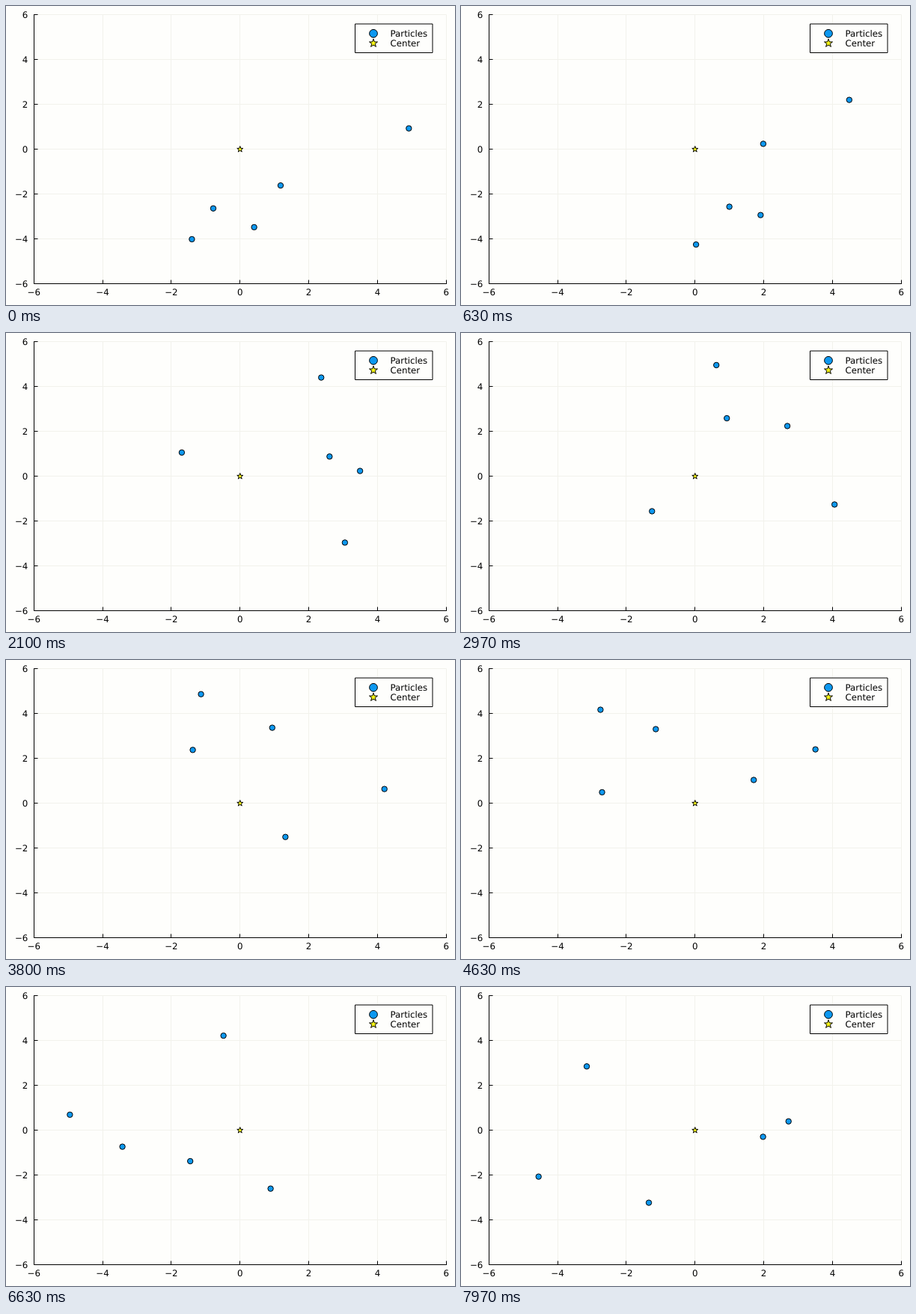
Write an HTML page with a canvas that moves like this. It is 600 px wide and 400 px high and loops after 8 s.

```html
<!DOCTYPE html>
<html lang="en">
<head>
<meta charset="utf-8">
<title>Orbiting particles</title>
<style>
  html, body { margin: 0; width: 100%; height: 100%; overflow: hidden; background: #fefefc; }
  canvas { display: block; width: 600px; height: 400px; }
</style>
</head>
<body>
<canvas id="stage"></canvas>
<script>
const W = 600, H = 400, LOOP = 8000;
const BG = '#fefefc', INK = '#000', GRID = '#f2f2ec', BLUE = '#0d98f0', YELLOW = '#fafa14';
const TICKS = [-6, -4, -2, 0, 2, 4, 6];

// Circular orbits: angular speed = sqrt(GM / r^3)
const GM = 10, STEP = 0.05;
const particles = [
  { r: 2, start: -53.83 },
  { r: 2.75, start: -106.45 },
  { r: 3.5, start: -83.26 },
  { r: 4.25, start: -109.25 },
  { r: 5, start: 10.76 }
];

const canvas = document.getElementById('stage');
const scale = window.devicePixelRatio || 1;
canvas.width = W * scale;
canvas.height = H * scale;
const ctx = canvas.getContext('2d');
ctx.scale(scale, scale);
ctx.font = '11.8px "DejaVu Sans", sans-serif';
ctx.textRendering = 'geometricPrecision';

const px = x => 312.75 + x * 45.92;
const py = y => 191.7 - y * 29.98;
const snap = v => Math.floor(v) + 0.5;

function line(x1, y1, x2, y2, color) {
  ctx.strokeStyle = color;
  ctx.beginPath();
  ctx.moveTo(x1, y1);
  ctx.lineTo(x2, y2);
  ctx.stroke();
}

function paint(fill) {
  ctx.fillStyle = fill;
  ctx.strokeStyle = INK;
  ctx.fill();
  ctx.stroke();
}

function disc(x, y, r) {
  ctx.beginPath();
  ctx.arc(x, y, r, 0, 2 * Math.PI);
  paint(BLUE);
}

function star(x, y, r) {
  ctx.beginPath();
  for (let i = 0; i < 10; i++) {
    const a = i * Math.PI / 5 - Math.PI / 2;
    const d = i % 2 ? r * 0.4 : r;
    ctx.lineTo(x + d * Math.cos(a), y + d * Math.sin(a));
  }
  ctx.closePath();
  paint(YELLOW);
}

function label(text, x, y, align) {
  ctx.fillStyle = INK;
  ctx.textAlign = align;
  ctx.fillText(text, x, y);
}

function drawAxes() {
  const left = snap(px(-6)), right = snap(px(6));
  const top = snap(py(6)), bottom = snap(py(-6));
  for (const v of TICKS) {
    line(left, snap(py(v)), right, snap(py(v)), GRID);
    line(snap(px(v)), top, snap(px(v)), bottom, GRID);
  }
  line(left, top - 0.5, left, bottom + 0.5, INK);
  line(left, bottom, right + 0.5, bottom, INK);
  for (const v of TICKS) {
    const x = snap(px(v)), y = snap(py(v));
    const text = String(v).replace('-', '\u2212');
    line(left, y, left + 5, y, INK);
    line(x, bottom, x, bottom - 5, INK);
    label(text, 29.3, py(v) + 4.3, 'right');
    label(text, px(v), 387.4, 'center');
  }
}

function drawLegend(x) {
  ctx.beginPath();
  ctx.rect(x, 24, 103.5, 38.5);
  paint(BG);
  disc(x + 24.5, 36.8, 5.4);
  star(x + 24.5, 49.8, 5.8);
  label('Particles', x + 47, 41.2, 'left');
  label('Center', x + 47, 54.1, 'left');
}

function draw(n) {
  const points = particles.map(({ r, start }) => {
    const a = start * Math.PI / 180 + n * STEP * Math.sqrt(GM / r ** 3);
    return { x: r * Math.cos(a), y: r * Math.sin(a) };
  });
  ctx.fillStyle = BG;
  ctx.fillRect(0, 0, W, H);
  drawAxes();
  for (const p of points) disc(px(p.x), py(p.y), 3.7);
  star(px(0), py(0), 4.2);
  // The legend gives way while a particle is in the top right corner
  const crowded = points.some(p => p.x > 3 && p.y > 3);
  drawLegend(crowded ? 55.5 : 466.5);
}

// Three steps per 100 ms, at 0, 30 and 70
function stepAt(t) {
  const rest = t % 100;
  return Math.floor(t / 100) * 3 + (rest >= 70 ? 2 : rest >= 30 ? 1 : 0);
}

function tick() {
  draw(stepAt(performance.now() % LOOP));
  requestAnimationFrame(tick);
}
tick();
</script>
</body>
</html>
```
